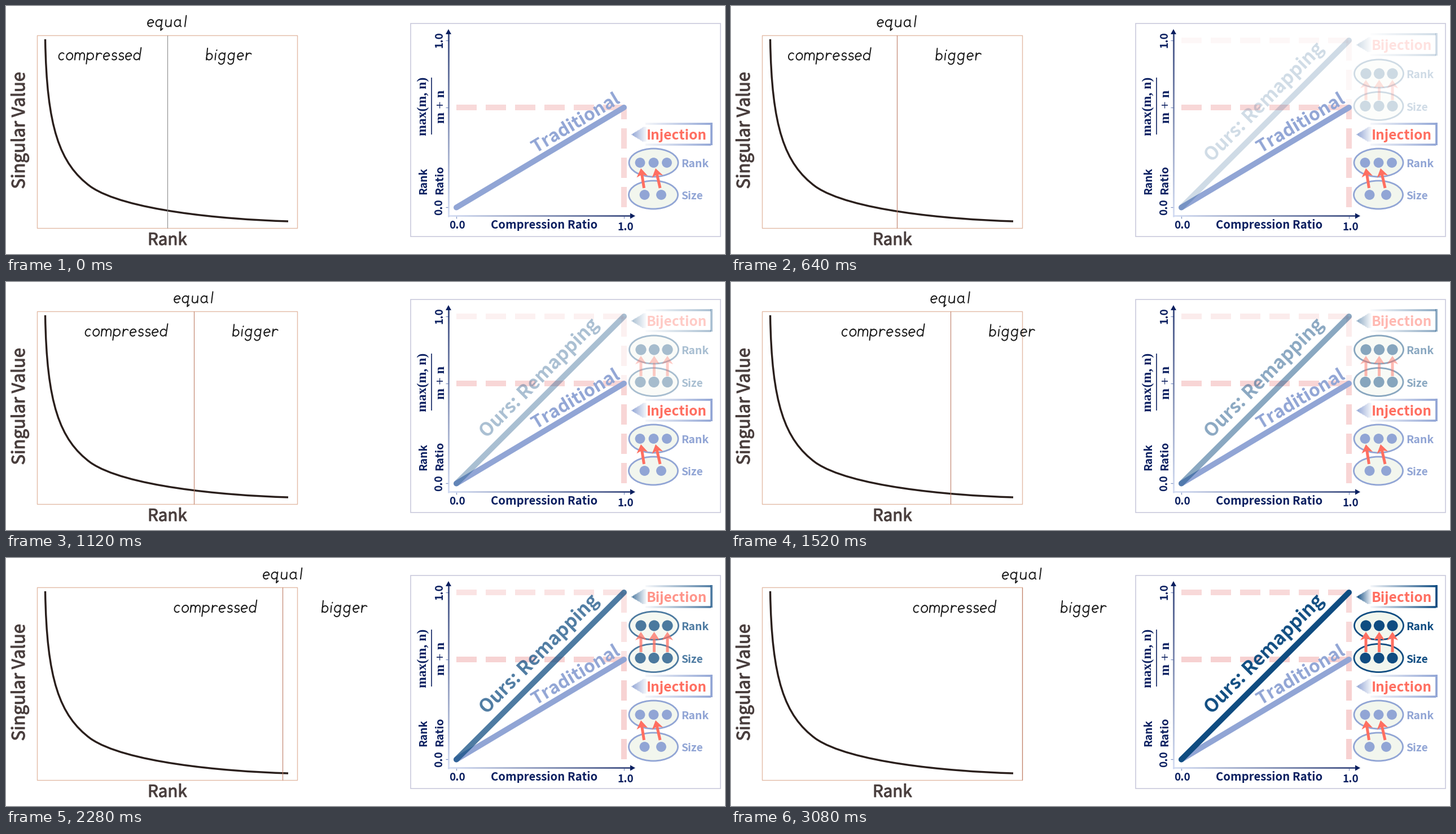
A matplotlib script that plays this animation: 1274 by 440 pixels, repeating every 3.6 s.

```python
import numpy as np
import matplotlib.pyplot as plt
from matplotlib.animation import FuncAnimation
from matplotlib.collections import LineCollection
from matplotlib.colors import to_rgb
from matplotlib.patches import Circle, Ellipse, PathPatch, Polygon, Rectangle
from matplotlib.path import Path
from matplotlib.patheffects import withStroke
from matplotlib.transforms import Affine2D

W, H, DPI = 1274, 440, 100
PX = 72 / DPI  # points per pixel
FRAMES, INTERVAL, STEPS = 90, 40, 76

NAVY, BLUE, PALE_BLUE = "#0b1f60", "#0f4c81", "#91a5d5"
RED, ROSE, IVORY = "#ff6f61", "#ec8c8c", "#f2f6ee"
BROWN, TAN, INK = "#4a3f3e", "#e3bba6", "#2a1f1c"
SANS, SERIF = "Noto Sans CJK JP", "Liberation Serif"

fig = plt.figure(figsize=(W / DPI, H / DPI), dpi=DPI, facecolor="white")
ax = fig.add_axes([0, 0, 1, 1])
ax.set(xlim=(0, W), ylim=(H, 0))
ax.axis("off")


def label(x, y, text, size, color, angle=0, ha="center", weight="bold",
          family=SANS, cap=0.37, z=5):
    """Place text so that (x, y) is the middle of its capital height."""
    a = np.radians(angle)
    return ax.text(x + cap * size * np.sin(a), y + cap * size * np.cos(a), text,
                   fontsize=size * PX, color=color, rotation=angle, ha=ha,
                   va="baseline", rotation_mode="anchor", weight=weight,
                   family=family, zorder=z)


def line(xs, ys, color, width, z=2, cap="butt", **kw):
    return ax.plot(xs, ys, color=color, lw=width * PX, zorder=z,
                   solid_capstyle=cap, dash_capstyle="butt", **kw)[0]


def dashes(xs, ys):
    unit = 10  # dash lengths are multiples of the line width
    return line(xs, ys, ROSE, unit, z=1, alpha=0.33,
                linestyle=(0, (36 / unit, 16 / unit)))


def strips(segments, start, end, width, z=3):
    """Draw line pieces whose colour runs from start to end."""
    f = np.linspace(0, 1, len(segments))[:, None]
    colors = (1 - f) * to_rgb(start) + f * to_rgb(end)
    art = LineCollection(segments, colors=colors, linewidths=width * PX,
                         capstyle="butt", zorder=z)
    return ax.add_collection(art)


def gradient_line(p, q, start, end, width, z=3):
    n = int(max(abs(q[0] - p[0]), abs(q[1] - p[1])))
    pts = np.linspace(p, q, n + 1)
    return strips(np.stack([pts[:-1], pts[1:]], axis=1), start, end, width, z)


def arrow(tail, tip, color, shaft=5, head=20, length=15, z=6):
    tail, tip = np.array(tail, float), np.array(tip, float)
    d = (tip - tail) / np.hypot(*(tip - tail))
    side = np.array([-d[1], d[0]])
    neck, barb = tip - d * length * 0.8, tip - d * length
    pts = [tail + side * shaft / 2, neck + side * shaft / 2, barb + side * head / 2,
           tip, barb - side * head / 2, neck - side * shaft / 2, tail - side * shaft / 2]
    return ax.add_patch(Polygon(pts, fc=color, ec="none", zorder=z))


def oval(cx, cy, dots, color, radius):
    parts = [ax.add_patch(Ellipse((cx, cy), 87, 50, fc=IVORY, ec=color,
                                  lw=2.8 * PX, zorder=4))]
    parts += [ax.add_patch(Circle((x, cy), radius, fc=color, ec="none", zorder=5))
              for x in dots]
    return parts


def callout(y, text, color):
    """Banner with a pointed left end; its rim grows darker to the right."""
    xs = np.arange(1107, 1134) + 0.5
    half = np.minimum((xs - 1107) * 0.62, 13)
    wedge = np.stack([np.column_stack([xs, y - half]),
                      np.column_stack([xs, y + half])], axis=1)
    return [strips(wedge, color, "#f4f6fa", 1),
            gradient_line((1133, y - 18.5), (1249, y - 18.5), "#f4f6fa", color, 3.6),
            gradient_line((1133, y + 18.5), (1249, y + 18.5), "#f4f6fa", color, 3.6),
            line([1250, 1250], [y - 20, y + 20], color, 3.8, z=3),
            label(1188.5, y, text, 24.5, RED)]


# ---- pen-written words, drawn from arcs and straight strokes ----
def arc(cx, cy, rx, ry, a0, a1):
    t = np.radians(np.linspace(a0, a1, 24))
    return np.column_stack([cx + rx * np.cos(t), cy + ry * np.sin(t)])


def stroke(*pts):
    return np.array(pts, float)


BOWL = arc(6, 6, 5, 5.8, 40, 320)
ROUND = {  # letter: (advance, strokes)
    "c": (13, [arc(6, 6, 5, 6, 50, 310)]),
    "o": (14, [arc(6.5, 6, 5.3, 6, 90, 450)]),
    "e": (14, [np.vstack([stroke((1.5, 5.5)), arc(6, 6, 5, 6, 10, 310)])]),
    "s": (12, [np.vstack([arc(5.5, 9, 3.5, 3, 30, 270), arc(5.5, 3, 4, 3, 90, -150)])]),
    "d": (16, [BOWL, stroke((12, 21), (11, 0))]),
    "a": (17, [BOWL, stroke((10.5, 11.5), (11, 2), (13, 0))]),
    "q": (16, [BOWL, stroke((11, 12), (10.5, -6.5), (13.5, -3.5))]),
    "g": (16, [BOWL, np.vstack([stroke((11, 12)), arc(6, -3, 4.7, 4.5, 0, -160)])]),
}
STEMMED = {
    "b": (15, [stroke((2, 20), (2, 0)), arc(6.5, 5.5, 5, 5.5, 160, -160)]),
    "p": (16, [stroke((2, 12), (1.5, -7)), arc(7, 6, 5.5, 5.8, 150, -150)]),
    "r": (13, [stroke((2, 12), (2, 0)), arc(7, 5, 5, 6.5, 180, 50)]),
    "m": (21, [stroke((2, 12), (2, 0)),
               np.vstack([arc(6, 7, 4, 5, 180, 0), stroke((10, 0))]),
               np.vstack([arc(14, 7, 4, 5, 180, 0), stroke((18, 0))])]),
    "u": (16, [np.vstack([stroke((2, 11.5)), arc(6.5, 4, 4.5, 4, 180, 360)]),
               stroke((11, 11.5), (11.5, 0))]),
    "i": (7, [stroke((2, 11.5), (2, 0)), stroke((3, 16), (3.3, 17))]),
    "l": (7, [stroke((3, 19), (2.5, 0))]),
}
LETTERS = {**ROUND, **STEMMED}


def handwrite(x, baseline, word, scale=1.03, slant=0.1):
    pieces = []
    for ch in word:
        advance, strokes = LETTERS[ch]
        for s in strokes:
            px = x + scale * (s[:, 0] + slant * s[:, 1])
            pieces.append(np.column_stack([px, baseline - scale * s[:, 1]]))
        x += scale * advance
    art = LineCollection(pieces, colors="#1c1c1c", linewidths=2 * PX,
                         capstyle="round", joinstyle="round", zorder=6)
    return ax.add_collection(art)


# ---- left chart ----
ax.add_patch(Rectangle((54.5, 52), 461, 342, fc="none", ec=TAN, lw=1.4 * PX))
curve = Path([(69.5, 59), (72, 215), (95, 280), (150, 320.5),
              (210, 362), (380, 378.5), (500, 382)], [Path.MOVETO] + [Path.CURVE4] * 6)
ax.add_patch(PathPatch(curve, fc="none", ec=INK, lw=3.4 * PX, zorder=3))
for args in ((21.5, 220.5, "Singular Value", 31, BROWN, 90),
             (286, 413, "Rank", 29.5, BROWN)):
    label(*args, weight="normal").set_path_effects(
        [withStroke(linewidth=1.1 * PX, foreground=BROWN)])

divider = line([285.5, 285.5], [52, 394], "#8a8a8a", 1.1, z=4)
movers = [divider, handwrite(92, 95.5, "compressed"),
          handwrite(353, 95.5, "bigger"), handwrite(249.5, 36.5, "equal")]

# ---- right chart: frame and axes ----
ax.add_patch(Rectangle((716.5, 31.5), 549.5, 378, fc="none", ec="#c9c9dc", lw=1.6 * PX))
gradient_line((784, 374), (784, 48), "#cdd8f2", NAVY, 3)
gradient_line((783, 372.5), (1108, 372.5), "#cdd8f2", NAVY, 3)
ax.add_patch(Polygon([(784, 41), (779, 50), (789, 50)], fc=NAVY, zorder=3))
ax.add_patch(Polygon([(1115, 372.5), (1106, 367.5), (1106, 377.5)], fc=NAVY, zorder=3))
for y in (61, 180, 357):
    line([779, 784], [y, y], "#7f93c4", 1.2)
for x in (798, 1095):
    line([x, x], [373, 377], "#7f93c4", 1.2)

label(954, 387, "Compression Ratio", 20.3, NAVY)
label(800, 387.5, "0.0", 19, NAVY)
label(1098, 390.5, "1.0", 19, NAVY)
label(766, 60, "1.0", 19, NAVY, 90)
label(766, 357, "0.0", 19, NAVY, 90)
label(738, 310, "Rank", 19, NAVY, 90)
label(767, 308, "Ratio", 19.5, NAVY, 90)
label(737, 178, "max(m, n)", 23.6, NAVY, 90, family=SERIF, cap=0.33)
label(769, 178, "m + n", 24, NAVY, 90, family=SERIF, cap=0.33)
line([753.5, 753.5], [127, 228], NAVY, 1.6)

# ---- right chart: the lasting method ----
base_dashes = [dashes([798, 1095], [180, 180]), dashes([1095, 1095], [357, 180])]
line([798, 1095], [357.5, 180], PALE_BLUE, 10, z=4, cap="round")
label(1008, 206, "Traditional", 32, PALE_BLUE, 30.9)
callout(227.5, "Injection", PALE_BLUE)
oval(1147.5, 278, (1123.5, 1147.5, 1171), PALE_BLUE, 8.9)
oval(1147, 335, (1131.5, 1161), PALE_BLUE, 8.9)
arrow((1130.5, 323), (1125, 288), RED)
arrow((1159, 323), (1151, 288), RED)
label(1196, 279, "Rank", 19.5, PALE_BLUE, ha="left")
label(1196, 336, "Size", 19.3, PALE_BLUE, ha="left")

# ---- right chart: the method that fades in ----
ours_dashes = [dashes([798, 1095], [61, 61]), dashes([1095, 1095], [97, 61])]
ours_dashes += [dashes([1095, 1095], [149, 113]), dashes([1095, 1095], [180, 165])]
ours = [line([798, 1095], [357.5, 61], BLUE, 10, z=4.5, cap="round"),
        label(943.5, 168.5, "Ours: Remapping", 33.3, BLUE, 45)]
ours += callout(68.5, "Bijection", BLUE)
ours += oval(1148, 120, (1125, 1148.5, 1172), BLUE, 9.6)
ours += oval(1147.5, 177.5, (1124, 1148, 1172), BLUE, 9.6)
ours += [arrow((x, 167), (x, 131), RED) for x in (1125, 1148.5, 1172)]
ours += [label(1196, 121, "Rank", 19.5, BLUE, ha="left"),
         label(1196, 178.5, "Size", 19.3, BLUE, ha="left")]


def ease(step):
    u = np.clip(0.5 + (step - 38.7) * 0.0154, 0, 1)
    return 2 * u * u if u < 0.5 else 1 - 2 * (1 - u) ** 2


def update(frame):
    step = min(max(frame - 1, 0), STEPS)
    fade = step / STEPS
    shift = Affine2D().translate(230 * ease(step), fade) + ax.transData
    for art in movers:
        art.set_transform(shift)
    divider.set_ydata([52 - fade, 394 - fade])
    divider.set_color("#c07f68" if step else "#8a8a8a")
    for art in ours:
        art.set_alpha(fade)
    for art in ours_dashes:
        art.set_alpha(0.33 * fade)
    for art in base_dashes:
        art.set_alpha(0.33 + 0.07 * fade)
    return movers + ours + ours_dashes + base_dashes


anim = FuncAnimation(fig, update, frames=FRAMES, interval=INTERVAL, repeat=True)
plt.show()
```
